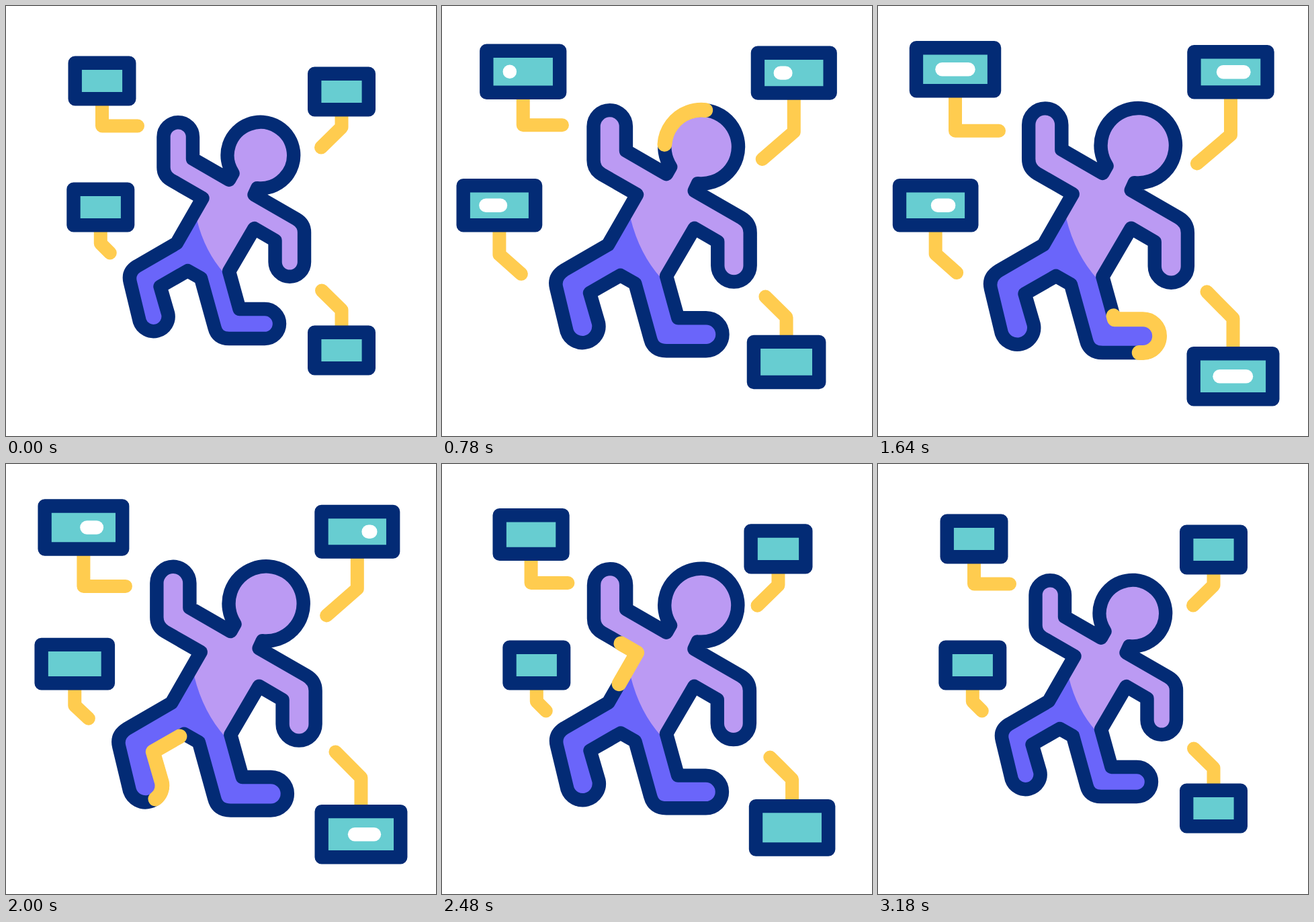
An HTML page that plays this animation: 640 px wide and 640 px high, repeating every 3600 ms.

```html
<!DOCTYPE html>
<html lang="en">
<head>
<meta charset="utf-8">
<title>Body sensors</title>
<style>
  html, body { margin: 0; width: 100%; height: 100%; overflow: hidden; background: #fff; }
  svg { display: block; width: 100%; height: 100%; }
  path, line, rect { stroke-linejoin: round; stroke-linecap: round; }
</style>
</head>
<body>
<svg id="stage" viewBox="0 0 640 640">
  <defs>
    <path id="outline" d="M234.5 195a21.75 21.75 0 0 1 43.5 0V227.5L332 258.7L337.5 249
      A49.3 49.3 0 1 1 374 271.2L369.5 281L432 317Q444 324 444 337V381
      a21.75 21.75 0 0 1-43.5 0V349L369.5 331L332 395L347.5 451H385a22 22 0 0 1 0 44H332
      Q314.5 495 310.5 479L290 405L270.5 394L229.5 417.5L241.2 457.8a22 22 0 0 1-42.4 11.4
      L184.8 411Q181 396 195 387.2L254 353L292.5 286L245.5 259Q234.5 252.5 234.5 240Z"/>
    <clipPath id="upper"><path d="M284 318Q296 366 325 398L335 420H640V0H0V318Z"/></clipPath>
  </defs>
  <g id="body">
    <use href="#outline" fill="#6a65fa"/>
    <use href="#outline" fill="#bb9af3" clip-path="url(#upper)"/>
    <use id="edge" href="#outline" fill="none" stroke="#032b75"/>
    <use id="pulse" href="#outline" fill="none" stroke="#ffcc4f"/>
  </g>
</svg>
<script>
const LOOP = 3600, ACTIVE = 3180, STROKE = 20.4;
const STAGGER = 170, SPAN = 2380;
const REST = { w: 101, h: 74 };
const stage = document.getElementById('stage');
const [body, edge, pulse, outline] = ['body', 'edge', 'pulse', 'outline'].map(id => document.getElementById(id));
const outlineLength = outline.getTotalLength();

const clamp = x => Math.min(1, Math.max(0, x));
const mix = (a, b, k) => a + (b - a) * k;
const smooth = (t, from, to) => {
  const x = clamp((t - from) / (to - from));
  return x * x * (3 - 2 * x);
};
// Rises from 0 to 1 and falls back symmetrically within SPAN; pace sets the softness.
const swell = (t, pace) => {
  const s = Math.max(0, Math.min(t, SPAN - t));
  return 1 - Math.exp(-((s / pace) ** 2));
};

function set(node, attrs) {
  for (const key in attrs) node.setAttribute(key, attrs[key]);
}
function add(tag, attrs) {
  const node = document.createElementNS('http://www.w3.org/2000/svg', tag);
  set(node, attrs);
  return stage.appendChild(node);
}

// In order of start. Pairs are [rest, extended]; x, y is where the wire leaves the monitor.
const monitors = [
  { side: -1, x: [140.8, 85], y: [336.5, 336.5], w: 128, h: 79.5,
    wire: [17, 40], dx: [14, 40], dy: [14, 35], pace: 700 },
  { side: -1, x: [499.5, 525], y: [164.5, 138.5], w: 129.5, h: 80.5,
    wire: [16, 54], dx: [-30.5, -50.5], dy: [30, 43], pace: 460 },
  { side: -1, x: [143, 115], y: [148.5, 136.5], w: 136.5, h: 84.5,
    wire: [30, 50], dx: [53, 65.5], dy: [0, 0], pace: 600 },
  { side: 1, x: [499.5, 528.5], y: [475.5, 507], w: 138, h: 88.5,
    wire: [23, 43], dx: [-29.5, -39.5], dy: [-29, -40], pace: 640 }
];

for (const m of monitors) {
  m.cable = add('path', { fill: 'none', stroke: '#ffcc4f', 'stroke-width': 20 });
  m.screen = add('rect', { fill: '#67cdd1', stroke: '#032b75', 'stroke-width': STROKE });
  m.bar = add('line', { stroke: '#fff', 'stroke-width': STROKE });
}

function drawMonitor(m, t) {
  const grow = swell(t, 350), reach = swell(t, m.pace);
  const x = mix(...m.x, grow), y = mix(...m.y, grow);
  const w = mix(REST.w, m.w, grow), h = mix(REST.h, m.h, grow);
  const cornerY = y - m.side * mix(...m.wire, reach);
  const top = m.side < 0 ? y - h : y;
  set(m.screen, { x: x - w / 2 + STROKE / 2, y: top + STROKE / 2, width: w - STROKE, height: h - STROKE });
  set(m.cable, { d: `M${x} ${y + m.side * 8}V${cornerY}l${mix(...m.dx, reach)} ${mix(...m.dy, reach)}` });

  const head = smooth(t, 420, 1100), tail = smooth(t, 1260, 1940);
  const middle = top + h / 2;
  set(m.bar, {
    x1: x + mix(-20, 19.5, tail), x2: x + mix(-20, 19.5, head) + .01, y1: middle, y2: middle,
    visibility: head > 0 && tail < 1 ? 'visible' : 'hidden'
  });
}

function drawBody(t) {
  const scale = 1 + .13 * (1 - Math.abs(1 - 2 * t / ACTIVE) ** 3);
  set(body, { transform: `translate(314 333.5) scale(${scale}) translate(-314 -333.5)` });
  set(edge, { 'stroke-width': STROKE / scale });

  const head = smooth(t, 38, 2955), tail = smooth(t, 165, 3100);
  const length = (head - tail) * outlineLength;
  set(pulse, {
    'stroke-width': 21.8 / scale,
    'stroke-dasharray': `${length} ${outlineLength - length}`,
    'stroke-dashoffset': -(17 + tail * outlineLength),
    visibility: length > .3 ? 'visible' : 'hidden'
  });
}

function render(now) {
  const t = Math.min(now % LOOP, ACTIVE);
  drawBody(t);
  monitors.forEach((m, i) => drawMonitor(m, t - i * STAGGER));
}

const start = performance.now();
function tick() {
  render(performance.now() - start);
  requestAnimationFrame(tick);
}
tick();
</script>
</body>
</html>
```
